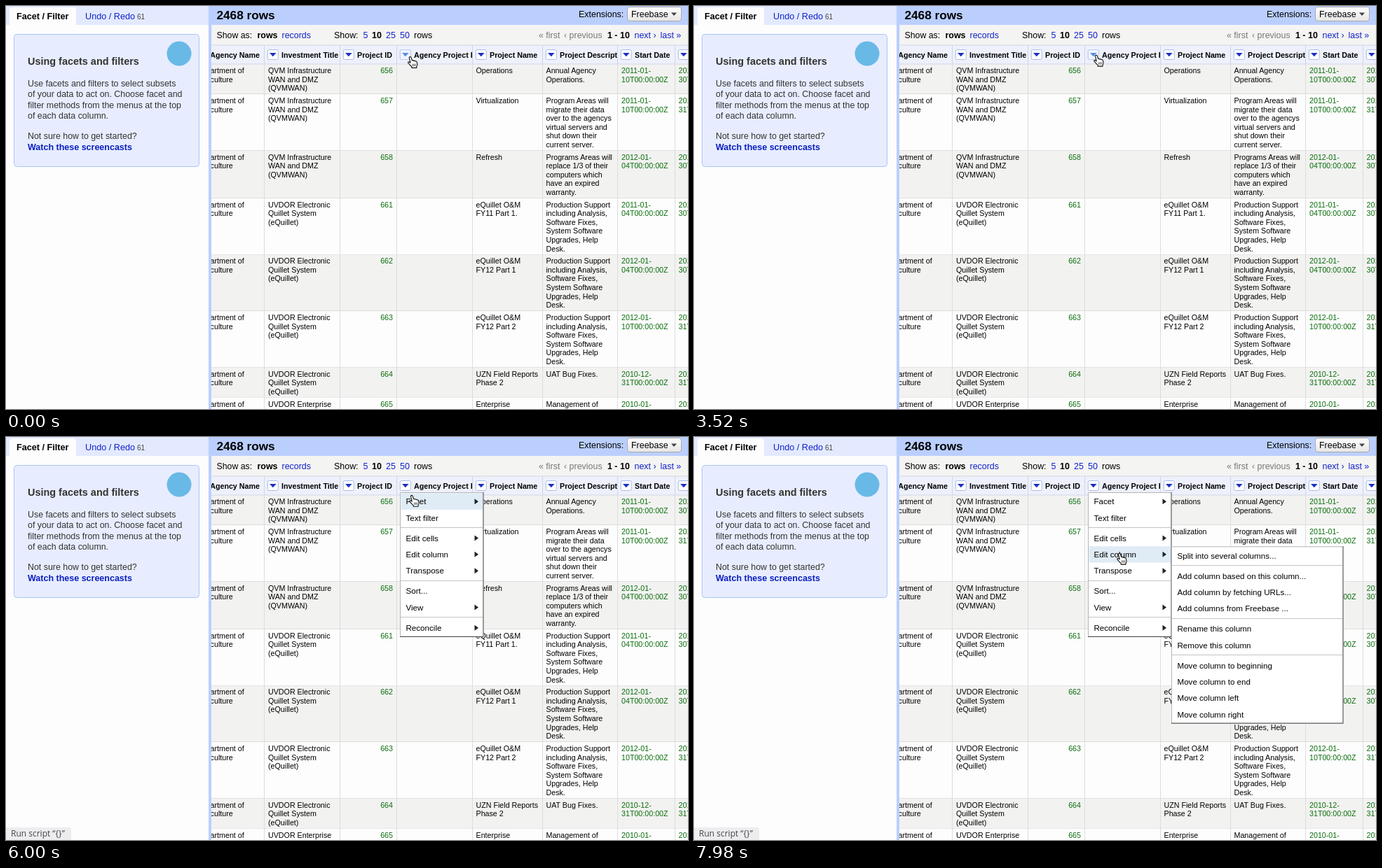
An HTML page for the animation above (8 s loop, 973 by 576 pixels).

```html
<!DOCTYPE html>
<html lang="en">
<head>
<meta charset="utf-8">
<title>Data table with column menu</title>
<style>
  html, body { margin: 0; width: 100%; height: 100%; overflow: hidden; background: #fdfdfd; }
  svg { display: block; }
  text { font-family: "Liberation Sans", Arial, sans-serif; white-space: pre; }
  .status { font-family: "Open Sans", sans-serif; }
</style>
</head>
<body>
<svg id="stage" width="973" height="576" viewBox="0 0 973 576"></svg>
<script>
const BLUE = '#1122cc', GREEN = '#0a6e0a', LINE = '#dcdcdc', BAR = '#bbcfff';
const UI = 12.45, CELL = 10.7, MENU = 11.6;
const LEADING = 12.55, ROW_PAD = 5.3, ITEM = 23.3, GAP = 5.8;

// The y of a text is the middle of its capitals.
const text = (x, y, str, size = UI, fill = '#000', extra = '') =>
  `<text x="${x}" y="${y + size * 0.36}" font-size="${size}" fill="${fill}" ${extra}>${str}</text>`;
const bold = (x, y, str, size = UI, fill = '#000') => text(x, y, str, size, fill, 'font-weight="bold"');
const rect = (x, y, w, h, fill, extra = '') =>
  `<rect x="${x}" y="${y}" width="${w}" height="${h}" fill="${fill}" ${extra}/>`;
const path = (d, fill, extra = '') => `<path d="${d}" fill="${fill}" ${extra}/>`;
const clipped = (x, y, w, h, inner) =>
  `<svg x="${x}" y="${y}" width="${w}" height="${h}" viewBox="${x} ${y} ${w} ${h}">${inner}</svg>`;
const lines = (x, y, list, fill, extra) =>
  list.map((s, i) => text(x, y + i * LEADING, s, CELL, fill, extra)).join('');

function sidePanel() {
  const help = ['Use facets and filters to select subsets', 'of your data to act on. Choose facet and',
    'filter methods from the menus at the top', 'of each data column.'];
  return rect(0, 0, 289, 576, '#fdfdfe') + rect(0, 0, 289, 27, '#e3eaff') +
    path('M5 27V6Q5 2 9 2H96Q100 2 100 6V27Z', '#fdfdfe') +
    bold(15, 14, 'Facet / Filter', 12.65) + text(113, 14, 'Undo / Redo', 12.65, BLUE) +
    text(187, 15, '61', 10, '#444') +
    rect(11.5, 40.5, 264, 189, '#e7edfe', 'rx="4" stroke="#aac6f8"') +
    '<circle cx="247" cy="68" r="17.5" fill="#69b9e6"/>' +
    bold(31, 78.5, 'Using facets and filters', 14.45, '#333') +
    help.map((s, i) => text(31, 110.5 + i * 15.5, s, 12.4, '#333')).join('') +
    text(31, 186, 'Not sure how to get started?', 12.4, '#333') +
    bold(31, 201.5, 'Watch these screencasts', 12.5, '#0b1fc0');
}

function topBars() {
  return rect(289, 0, 684, 27, BAR) + rect(289, 0, 4.5, 576, BAR) +
    rect(293.5, 27, 680, 29, '#f4f4f2') +
    bold(300.5, 13, '2468 rows', 17.2) + text(817, 11.5, 'Extensions:') +
    '<linearGradient id="sheen" x2="0" y2="1"><stop stop-color="#fff"/><stop offset="1" stop-color="#e6e6e6"/></linearGradient>' +
    rect(886.5, 1.5, 77, 20, 'url(#sheen)', 'rx="3.5" stroke="#aaa"') +
    text(892, 11.5, 'Freebase') + path('M949 9.5h8l-4 4.5z', '#444') +
    text(300.5, 41.5, 'Show as:', 12.3) + bold(358.5, 41.5, 'rows') + text(393.5, 41.5, 'records', UI, BLUE) +
    text(468, 41.5, 'Show:') + text(509.5, 41.5, '5', UI, BLUE) + bold(522, 41.5, '10') +
    text(542, 41.5, '25', UI, BLUE) + text(562, 41.5, '50', UI, BLUE) + text(582, 41.5, 'rows') +
    text(760, 41.5, '« first', UI, '#777') + text(796, 41.5, '‹ previous', UI, '#777') +
    bold(858, 41.5, '1 - 10') + text(896.5, 41.5, 'next ›', UI, BLUE) + text(933.5, 41.5, 'last »', UI, BLUE);
}

const dropButton = (x, hot) =>
  rect(x - 7.5, 62.5, 15, 14, hot ? '#eef4ff' : '#fff', `rx="2" stroke="${hot ? '#bccdf2' : '#a9bce8'}"`) +
  path(`M${x - 4.8} 67h9.6l-4.8 5.2z`, hot ? '#5c8fd8' : '#1a2fc4');

// Left edge, right edge, title
const COLUMNS = [[293, 368.5, 'Agency Name'], [368.5, 476.5, 'Investment Title'], [476.5, 557.5, 'Project ID'],
  [557.5, 665.5, 'Agency Project ID'], [665.5, 765.5, 'Project Name'], [765.5, 872.5, 'Project Description'],
  [872.5, 954.5, 'Start Date'], [954.5, 973, '']];

const WAN = ['QVM Infrastructure', 'WAN and DMZ', '(QVMWAN)'];
const PERMIT = ['UVDOR Electronic', 'Quillet System', '(eQuillet)'];
const SUPPORT = ['Production Support', 'including Analysis,', 'Software Fixes,', 'System Software', 'Upgrades, Help', 'Desk.'];
const ROWS = [
  [656, WAN, ['Operations'], ['Annual Agency', 'Operations.'], '2011-01-10', 30],
  [657, WAN, ['Virtualization'], ['Program Areas will', 'migrate their data', 'over to the agencys', 'virtual servers and', 'shut down their', 'current server.'], '2011-01-10', 31],
  [658, WAN, ['Refresh'], ['Programs Areas will', 'replace 1/3 of their', 'computers which', 'have an expired', 'warranty.'], '2012-01-04', 30],
  [661, PERMIT, ['eQuillet O&amp;M', 'FY11 Part 1.'], SUPPORT, '2011-01-04', 30],
  [662, PERMIT, ['eQuillet O&amp;M', 'FY12 Part 1'], SUPPORT, '2012-01-04', 30],
  [663, PERMIT, ['eQuillet O&amp;M', 'FY12 Part 2'], SUPPORT, '2012-01-10', 31],
  [664, PERMIT, ['UZN Field Reports', 'Phase 2'], ['UAT Bug Fixes.'], '2010-12-31', 31],
  [665, ['UVDOR Enterprise', '', ''], ['Enterprise'], ['Management of'], '2010-01-04', 30]
];

function table() {
  let top = 83.3, body = '';
  ROWS.forEach(([id, title, name, about, date, endDay], i) => {
    const height = Math.max(title.length, about.length) * LEADING + ROW_PAD, y = top + 9;
    const stamp = (head, day) => [head, day + 'T00:00:00Z'];
    body += rect(293, top, 680, height, i % 2 ? '#fdfdfe' : '#f2f2f1') +
      rect(293, Math.round(top + height) - 1, 680, 1, LINE) +
      lines(291.6, y, ['artment of', 'culture']) + lines(374, y, title) +
      lines(552, y, [id], GREEN, 'text-anchor="end"') +
      lines(670.5, y, name) + lines(770.5, y, about) +
      lines(878, y, stamp(date.slice(0, 8), date.slice(8)), GREEN) +
      lines(959.5, y, stamp('2011-', endDay), GREEN);
    top += height;
  });
  const head = rect(293, 56, 680, 27, '#eef1fb') + rect(293, 55.5, 680, 1, '#d3d8e6') + rect(293, 82.5, 680, 1, '#d3d8e6');
  const cells = COLUMNS.map(([left, right, title], i) =>
    (i ? dropButton(left + 12.3) : '') +
    clipped(left, 56, right - left, 27, bold(i ? left + 24.5 : 291.2, 70, title, CELL)) +
    rect(Math.floor(right), 56, 1, 27, '#d0d5e4') + rect(Math.floor(right), 83, 1, 493, LINE)).join('');
  return clipped(293, 55, 680, 521, body + head + cells);
}

// '-' is a separator, a trailing '>' marks a submenu.
function makeMenu(id, x, top, width, items) {
  let y = top + 1.5, inner = '';
  const spots = {};
  for (const item of items) {
    if (item === '-') {
      inner += rect(x + 1, Math.round(y + GAP / 2) - 1, width - 2, 1, '#c4c4c4');
      y += GAP;
      continue;
    }
    const label = item.replace('>', ''), mid = y + ITEM / 2;
    spots[label] = [y, y + ITEM];
    inner += text(x + 8.5, mid, label, MENU);
    if (item.endsWith('>')) inner += path(`M${x + width - 13} ${mid - 4}v8l5.5-4z`, '#222');
    y += ITEM;
  }
  const h = y + 1.5 - top, r = x + width, b = top + h;
  const markup = `<g id="${id}" visibility="hidden">` + rect(x, top, width, h, '#fff') +
    rect(x + 1.5, 0, width - 2, ITEM, '#dfecf6', 'class="hover"') + inner +
    path(`M${x + .5} ${b}V${top + .5}H${r}`, 'none', 'stroke="#b5b5b5"') +
    path(`M${x} ${b - .5}H${r - .5}V${top}`, 'none', 'stroke="#5a5a5a" stroke-width="1.2"') + '</g>';
  return { markup, spots };
}

const mainMenu = makeMenu('main', 562, 79, 119.5,
  ['Facet>', 'Text filter', '-', 'Edit cells>', 'Edit column>', 'Transpose>', '-', 'Sort...', 'View>', '-', 'Reconcile>']);
const cellsMenu = makeMenu('cells', 681, 133, 167.5,
  ['Transform...', 'Common transforms>', '-', 'Fill down', 'Blank down', '-', 'Split multi-valued cells...', 'Join multi-valued cells...', '-', 'Cluster and edit...']);
const columnMenu = makeMenu('column', 681, 156.3, 245.5,
  ['Split into several columns...', '-', 'Add column based on this column...', 'Add column by fetching URLs...', 'Add columns from Freebase ...',
    '-', 'Rename this column', 'Remove this column', '-', 'Move column to beginning', 'Move column to end', 'Move column left', 'Move column right']);

const cursors = '<g id="hand">' +
  path('M2.2 1.4Q3.6-.4 5 1.4L6.4 6Q7.6 5 8.6 6.4Q10 5.6 10.9 7Q12.6 6.4 13.2 8.2L13.8 11.6Q13.8 13.4 12.8 14.6V16.4H6V15L3 12L.6 9.2Q.2 7.6 2 7.8L4 9.2Z', '#fff', 'stroke="#111" stroke-width="1.1" stroke-linejoin="round"') +
  path('M7.4 10.6v3.4M9.3 10.6v3.4M11.2 10.6v3.4', 'none', 'stroke="#222" stroke-width=".8"') + '</g>' +
  '<g id="arrow">' + path('M0 0V14L3.2 11L5.4 16L7.8 15L5.6 10.2H10Z', '#000', 'stroke="#fff" stroke-width=".9"') + '</g>';

document.getElementById('stage').innerHTML = sidePanel() + topBars() + table() +
  `<g id="hot">${dropButton(569.8, true)}</g>` +
  mainMenu.markup + cellsMenu.markup + columnMenu.markup +
  '<g id="status">' + path('M0 558H90Q93 558 93 561V576H0Z', '#ededf0') +
  text(7, 567, 'Run script “{}”', 12, '#444', 'class="status"') + '</g>' + cursors;

const LOOP = 8000, MENU_OPENS = 5040, HAND_RETURNS = 5960;
// Time, then the tip of the pointer
const TRACK = [[0, 576.5, 72], [1240, 575, 71.7], [3520, 573.7, 69.7], [5580, 574, 70], [5900, 574.5, 72],
  [6340, 593, 119.5], [6500, 593.5, 120], [7020, 601.5, 145], [7980, 606.7, 165.7], [8000, 606.7, 165.7]];

function pointerAt(t) {
  const i = TRACK.findIndex(step => step[0] > t);
  const [t0, x0, y0] = TRACK[i - 1], [t1, x1, y1] = TRACK[i];
  const k = (t - t0) / (t1 - t0);
  return [x0 + (x1 - x0) * k, y0 + (y1 - y0) * k];
}

const get = id => document.getElementById(id);
const show = (id, on) => get(id).setAttribute('visibility', on ? 'visible' : 'hidden');
const hover = document.querySelector('#main .hover');
document.querySelectorAll('#cells .hover, #column .hover').forEach(el => el.remove());

function draw(now) {
  const t = now % LOOP, [x, y] = pointerAt(t);
  const open = t >= MENU_OPENS, arrow = open && t < HAND_RETURNS;
  const hit = open && !arrow && Object.entries(mainMenu.spots).find(([, [a, b]]) => y >= a && y < b);
  const label = hit ? hit[0] : '';
  show('main', open);
  show('hot', !open);
  show('cells', label === 'Edit cells');
  show('column', label === 'Edit column');
  show('status', open && t >= HAND_RETURNS);
  show('hand', !arrow);
  show('arrow', arrow);
  hover.setAttribute('visibility', hit ? 'visible' : 'hidden');
  if (hit) hover.setAttribute('y', hit[1][0]);
  get('hand').setAttribute('transform', `translate(${x - 3.5} ${y})`);
  get('arrow').setAttribute('transform', `translate(${x} ${y})`);
}

const start = performance.now();
function tick() {
  draw(performance.now() - start);
  requestAnimationFrame(tick);
}
tick();
</script>
</body>
</html>
```
